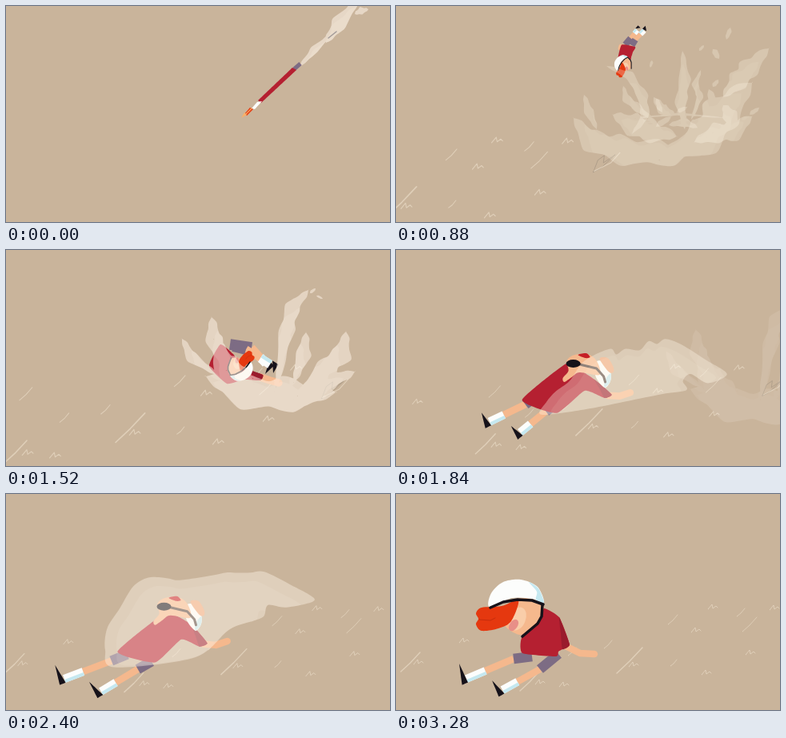
Write an HTML page with a canvas that moves like this. It is 480 px wide and 270 px high and loops after 3360 ms.

```html
<!DOCTYPE html>
<html lang="en">
<head>
<meta charset="utf-8">
<title>Crash landing</title>
<style>
html, body { margin: 0; width: 100%; height: 100%; overflow: hidden; background: #c9b49b; }
canvas { display: block; width: 480px; height: 270px; }
</style>
</head>
<body>
<canvas id="stage" width="480" height="270"></canvas>
<script>
const ctx = document.getElementById('stage').getContext('2d');
const LOOP = 3360, STEP = 80;
const C = {
  bg: '#c9b49b', red: '#b52031', dark: '#991b2c', skin: '#f5b88d', pink: '#e88f88',
  hair: '#e5380f', shorts: '#7d6c84', white: '#fcfdfc', ice: '#c5e8f0', black: '#16121a',
  mark: 'rgba(238,225,205,.6)'
};

const clamp = u => Math.max(0, Math.min(1, u));
const ramp = (t, a, b) => clamp((t - a) / (b - a));
const mix = (a, b, u) => a.map((v, i) => v + (b[i] - v) * u);
const linear = u => u;
const easeOut = u => 1 - (1 - u) ** 2;
const easeInOut = u => u * u * (3 - 2 * u);

// keys: [time, values, easing towards this key]
function at(keys, t) {
  const i = keys.findIndex(k => t <= k[0]);
  if (i < 0) return keys[keys.length - 1][1];
  if (i === 0) return keys[0][1];
  const [t0, v0] = keys[i - 1], [t1, v1, ease = linear] = keys[i];
  return mix(v0, v1, ease(ramp(t, t0, t1)));
}

// Closed Catmull-Rom curve through a flat list of points
function blob(p, path = new Path2D(), k = 0.15) {
  const n = p.length / 2;
  const P = i => { const j = (i + n) % n * 2; return [p[j], p[j + 1]]; };
  path.moveTo(p[0], p[1]);
  for (let i = 0; i < n; i++) {
    const [a, b, c, d] = [P(i - 1), P(i), P(i + 1), P(i + 2)];
    path.bezierCurveTo(b[0] + (c[0] - a[0]) * k, b[1] + (c[1] - a[1]) * k,
      c[0] - (d[0] - b[0]) * k, c[1] - (d[1] - b[1]) * k, c[0], c[1]);
  }
  path.closePath();
  return path;
}
function fill(color, p, k) {
  ctx.fillStyle = color;
  ctx.fill(blob(p, new Path2D(), k));
}
function line(color, w, p, cap = 'round') {
  ctx.strokeStyle = color;
  ctx.lineWidth = w;
  ctx.lineCap = cap;
  ctx.lineJoin = 'round';
  ctx.beginPath();
  for (let i = 0; i < p.length; i += 2) ctx.lineTo(p[i], p[i + 1]);
  ctx.stroke();
}
function oval(color, x, y, rx, ry, rot = 0) {
  ctx.fillStyle = color;
  ctx.beginPath();
  ctx.ellipse(x, y, rx, ry, rot, 0, 7);
  ctx.fill();
}

// Camera: x, y, scale
const CAMERA = [
  [0, [-440, 145, 1.145]],
  [240, [-400, 45, 1.145], easeOut],
  [560, [-382, 20, 1.145]],
  [1200, [-272, -8, 1.145]],
  [1520, [-179, -16, 1.145]],
  [2160, [-22, 5, 1], easeOut],
  [2720, [0, 0, 1], easeOut]
];

// Ground marks: slashes x, y, half size; ticks x, y
const SLASHES = [
  [18, 210, 12], [292, 208, 16], [346, 157, 6], [442, 163, 9], [431, 148, 5],
  [178, 171, 7], [265, 188, 5], [220, 197, 5], [167, 234, 12], [347, 211, 4]
];
const TICKS = [
  [28, 210], [297, 213], [180, 235], [396, 141], [443, 198], [473, 142],
  [375, 170], [210, 238], [85, 183], [388, 223]
];

function ground(t) {
  const [x, y, s] = at(CAMERA, t);
  ctx.save();
  ctx.translate(x, y);
  ctx.scale(s, s);
  SLASHES.forEach(([x, y, r]) => line(C.mark, r > 9 ? 1.4 : 0.9, [x - r, y + r, x, y + 1, x + r, y - r]));
  TICKS.forEach(([x, y]) => line(C.mark, 1, [x - 6, y + 3, x - 1, y - 3, x, y + 2, x + 4, y - 1, x + 6, y + 1]));
  line('rgba(155,140,124,.6)', 0.8, [501, 176, 506, 163, 513, 158, 512, 166, 525, 157, 509, 172, 501, 176]);
  line(C.mark, 1, [502, 175, 520, 166, 530, 155]);
  ctx.restore();
}

// Pose: torso (8 points), two legs (hip, knee, ankle, toe), arm (3 points),
// head x, y, degrees, scale, limb width
const TUMBLE = [
  264, 97, 285, 104, 288, 100, 291, 96, 293, 93, 300, 86, 275, 74, 262, 94,
  282, 76, 295, 69, 311, 60, 318, 58,
  294, 81, 303, 74, 324, 65, 328, 67,
  276, 78, 273, 76, 271, 79, 269, 106, -40, 0.44, 8];
const CRASH = [
  284, 130, 298, 148, 321, 156, 318, 163, 297, 162, 276, 167, 254, 145, 268, 118,
  280, 118, 307, 122, 325, 142, 324, 155,
  284, 120, 300, 124, 330, 143, 334, 154,
  318, 159, 330, 163, 341, 166, 293, 148, 150, 0.45, 11];
const LIE = [
  214, 152, 237, 165, 258, 186, 248, 190, 222, 179, 184, 212, 136, 197, 199, 148,
  148, 200, 129, 209, 70, 231, 58, 214,
  178, 211, 162, 219, 116, 247, 101, 235,
  253, 187, 268, 187, 282, 181, 230, 148, 0, 0.8, 10];
const SIT = [
  182, 143, 204, 154, 217, 188, 208, 194, 203, 197, 200, 203, 158, 199, 157, 180,
  170, 203, 147, 206, 88, 231, 79, 212,
  203, 200, 180, 219, 133, 245, 120, 233,
  212, 190, 230, 199, 248, 200, 150, 140, 0, 1, 10];

// The tumbling body turned upside down, smaller and slimmer
function makeDive() {
  const a = -0.72, ca = Math.cos(a), sa = Math.sin(a), out = [];
  for (let i = 0; i < 40; i += 2) {
    const x = TUMBLE[i] - 269, y = TUMBLE[i + 1] - 106;
    const along = (x * ca + y * sa) * 0.62, across = (y * ca - x * sa) * 0.38;
    out.push(298 - along * 0.08 + across, 63 - along);
  }
  return [...out, -60, 0.18, 5];
}
const POSES = [
  [560, makeDive()], [1200, TUMBLE], [1520, CRASH, easeInOut], [2080, LIE, easeOut],
  [2320, LIE], [2640, SIT, easeInOut]
];

function leg([hx, hy, kx, ky, ax, ay, tx, ty], w) {
  const sx = kx + (ax - kx) * 0.6, sy = ky + (ay - ky) * 0.6;
  const len = Math.hypot(ax - sx, ay - sy) || 1;
  const dx = (ax - sx) / len, dy = (ay - sy) / len;
  const side = (tx - ax) * -dy + (ty - ay) * dx > 0 ? -1 : 1;
  const nx = -dy * side * w * 0.5, ny = dx * side * w * 0.5;
  line(C.skin, w * 0.85, [kx, ky, sx, sy], 'butt');
  line(C.shorts, w * 1.25, [hx, hy, kx, ky], 'butt');
  line(C.white, w, [sx, sy, ax, ay], 'butt');
  line(C.ice, w * 0.4, [sx + nx * 0.6, sy + ny * 0.6, ax + nx * 0.6, ay + ny * 0.6], 'butt');
  fill(C.black, [tx, ty, ax + nx, ay + ny, ax + nx + dx * w * 0.8, ay + ny + dy * w * 0.8], 0);
}

function sittingHead() {
  fill(C.skin, [0, -9, 33, -4, 31, 13, 22, 25, 7, 36, -8, 30, -14, 20]);
  oval('#f9cda9', 2, 16, 10, 15, 0.4);
  oval(C.pink, -3, 24, 5, 8, 0.6);
  line(C.black, 3.5, [33, -1, 32, 13, 27, 22, 8, 38]);
  fill(C.hair, [3, -7, -18, 0, -43, 2, -50, 9, -47, 16, -50, 23, -43, 31, -22, 28, -6, 19]);
  line('#c62c0c', 1, [-46, 17, -32, 18, -26, 15]);
  fill(C.white, [-33, 1, -31, -16, -16, -30, 6, -33, 27, -24, 35, -4, 20, -9, -5, -10]);
  fill(C.ice, [16, -30, 28, -22, 35, -4, 25, -8, 26, -18]);
  line(C.black, 3.5, [-32, 2, -16, -5, 2, -8, 20, -7, 34, -2]);
}

// Thrown back, face up, with dark glasses
function lyingHead() {
  fill(C.white, [8, -8, 20, -8, 27, 6, 26, 17, 19, 24, 8, 10]);
  fill(C.ice, [27, 6, 26, 17, 19, 24, 20, 14]);
  fill(C.skin, [-28, -10, -18, -17, 0, -17, 10, -8, 13, 8, -12, 5, -22, 11, -31, 17, -33, 12, -26, 3]);
  fill('#eda77c', [13, -12, 23, -13, 30, -2, 30, 5, 24, 4]);
  fill('#c51f26', [-14, -17, -4, -19, 1, -14, -5, -13]);
  line('#54433e', 3, [-12, -5, 9, 0, 18, 10, 20, 17]);
  oval(C.black, -20, -6, 9, 5);
}

function figure(t) {
  if (t < 320) return;
  const p = at(POSES, t);
  const rise = t < 560 ? 90 * (1 - easeOut(ramp(t, 320, 560))) : -12 * Math.sin(Math.PI * ramp(t, 560, 1200));
  const [hx, hy, rot, scale, w] = p.slice(38);
  ctx.save();
  ctx.translate(0, rise);
  line(C.skin, w * 0.85, p.slice(32, 38));
  leg(p.slice(16, 24), w);
  leg(p.slice(24, 32), w);
  fill(C.red, p.slice(0, 16), 0.08);
  fill(C.dark, [...p.slice(2, 8), (p[2] + p[6]) / 2, (p[3] + p[7]) / 2], 0.08);
  ctx.translate(hx, hy);
  if (t >= 1680 && t < 2440) lyingHead();
  else {
    ctx.rotate(rot * Math.PI / 180);
    ctx.scale(scale, scale);
    sittingHead();
  }
  ctx.restore();
}

// Billowing strip along a line of points, pointed at both ends
function ribbon(w, p, path) {
  const n = p.length / 2 - 1, steps = n * 4, left = [], right = [];
  const pos = u => {
    const i = Math.min(n - 1, Math.floor(u * n)), f = u * n - i, j = i * 2;
    return [p[j] + (p[j + 2] - p[j]) * f, p[j + 1] + (p[j + 3] - p[j + 1]) * f];
  };
  for (let i = 0; i <= steps; i++) {
    const u = i / steps, [x, y] = pos(u), a = pos(clamp(u - 0.1)), b = pos(clamp(u + 0.1));
    const dir = Math.atan2(b[1] - a[1], b[0] - a[0]);
    const r = w * Math.sin(Math.PI * u) ** 0.7, l = r * (1 + 0.25 * Math.sin(i * 1.9)), m = r * (1 + 0.2 * Math.cos(i * 1.6));
    left.push([x + Math.sin(dir) * l, y - Math.cos(dir) * l]);
    right.unshift([x - Math.sin(dir) * m, y + Math.cos(dir) * m]);
  }
  blob([...left, ...right].flat(), path);
}
function cloud(add) {
  const path = new Path2D();
  add((w, ...p) => ribbon(w, p, path));
  return path;
}
function dust(path, alpha, cx, cy, size = 1, dx = 0, dy = 0) {
  if (alpha <= 0) return;
  ctx.save();
  ctx.translate(cx + dx, cy + dy);
  ctx.scale(size, size);
  ctx.translate(-cx, -cy);
  ctx.fillStyle = `rgba(255,245,233,${alpha})`;
  ctx.fill(path);
  ctx.clip(path);
  ctx.translate(cx, cy + 5);
  ctx.scale(0.88, 0.88);
  ctx.translate(-cx, -cy);
  ctx.fillStyle = `rgba(255,245,233,${alpha * 0.25})`;
  ctx.fill(path);
  ctx.restore();
}

const TAIL = cloud(add => {
  add(4, 367, 76, 385, 55, 410, 32);
  add(8, 400, 46, 416, 22, 442, -10);
  add(4, 436, 10, 444, 6, 453, 4);
});
const SPLASH = cloud(add => {
  add(7, 303, 70, 306, 105, 301, 135, 306, 168);
  add(4, 326, 94, 319, 112, 325, 128, 314, 156);
  add(5, 286, 163, 305, 159, 322, 166);
  add(5, 229, 114, 233, 130, 248, 142, 268, 158);
  add(6, 270, 130, 278, 143, 294, 150);
  add(14, 216, 150, 240, 162, 266, 171, 296, 177);
  add(12, 318, 184, 345, 173, 368, 170, 390, 152);
  add(8, 354, 138, 362, 150, 374, 178);
  add(12, 354, 128, 372, 108, 388, 90, 411, 67);
  add(1.5, 245, 154, 300, 149, 356, 154);
  add(3, 363, 41, 358, 56);
  add(4, 341, 68, 349, 80);
  add(3, 341, 115, 348, 106);
  add(2, 324, 70, 330, 63);
  add(3, 387, 150, 399, 141);
});
const ARC = cloud(add => {
  add(6, 318, 61, 347, 73, 364, 100, 366, 125, 350, 146);
  add(16, 277, 126, 298, 154, 340, 167, 400, 171, 450, 145);
  add(23, 385, 178, 440, 150, 465, 117, 500, 82);
  add(7, 446, 90, 453, 112, 436, 146);
  add(5, 290, 97, 296, 118, 306, 140);
  add(2, 375, 54, 373, 63);
  add(4, 377, 100, 388, 119);
  add(3, 406, 119, 419, 112);
  add(4, 380, 137, 399, 124);
});
const BURST = cloud(add => {
  add(6, 220, 111, 232, 134, 264, 156);
  add(9, 257, 84, 260, 112, 275, 150);
  add(14, 260, 112, 275, 145, 308, 160);
  add(9, 378, 50, 358, 72, 350, 105, 338, 170);
  add(8, 375, 103, 372, 130, 360, 165);
  add(12, 425, 102, 420, 130, 398, 150, 365, 182);
  add(9, 436, 152, 405, 164, 370, 180);
  add(20, 250, 158, 298, 178, 360, 181, 412, 178);
  add(2, 380, 54, 387, 48);
  add(1.5, 388, 57, 396, 61);
});

const SWEEP = [
  165, 213, 172, 195, 185, 180, 205, 165, 222, 140, 240, 128, 264, 119, 272, 127, 285, 119, 305, 121, 318, 108,
  330, 112, 342, 105, 365, 113, 400, 135, 430, 155, 403, 168, 378, 155, 367, 165, 372, 178, 335, 184, 230, 205];
const VEIL = [
  90, 222, 50, 195, 36, 150, 45, 110, 62, 78, 82, 68, 103, 84, 120, 78, 134, 88, 185, 72, 210, 83,
  225, 78, 250, 88, 258, 73, 285, 79, 318, 97, 270, 101, 250, 114, 254, 133, 215, 128, 193, 147, 246, 203];

function drift(t, home) {
  const now = at(CAMERA, t), then = at(CAMERA, home);
  return [now[0] - then[0], now[1] - then[1]];
}

function clouds(t) {
  if (t >= 240 && t < 1120)
    dust(SPLASH, 0.52 * (1 - ramp(t, 640, 1120)), 305, 165, 0.2 + 0.8 * easeOut(ramp(t, 200, 560)), ...drift(t, 560));
  if (t >= 720 && t < 1520)
    dust(ARC, 0.5 * ramp(t, 700, 1040) * (1 - ramp(t, 1240, 1500)), 390, 150, 1, ...drift(t, 1200));
  if (t >= 1360 && t < 1920)
    dust(BURST, 0.5 * (1 - ramp(t, 1560, 1920)), 320, 180, 0.25 + 0.75 * easeOut(ramp(t, 1340, 1520)), ...drift(t, 1520));
  if (t >= 1640 && t < 3280) {
    const u = easeInOut(ramp(t, 2160, 2720)), out = ramp(t, 2720, 3280);
    const alpha = (0.47 * ramp(t, 1600, 1920) - 0.17 * u) * (1 - out);
    dust(blob(mix(SWEEP, VEIL, u)), alpha, 300 - 140 * u, 155,
      0.5 + 0.5 * easeOut(ramp(t, 1600, 2080)), -100 * out, -60 * out);
  }
}

function streak(t) {
  if (t >= 240) return;
  const u = t / 80;
  ctx.save();
  ctx.translate(-5 * u, 14 * u);
  dust(TAIL, 0.55, 405, 38);
  line('#a29a99', 1.5, [403, 40, 413, 32]);
  line(C.shorts, 5, [360, 79, 368, 72], 'butt');
  fill(C.red, [315, 118, 358, 77, 363, 80, 319, 121], 0);
  fill(C.white, [307, 128, 314, 120, 320, 119, 311, 129], 0);
  fill(C.hair, [298, 135, 305, 127, 309, 129, 301, 137], 0);
  fill('#f6b06c', [294, 140, 298, 133, 301, 136], 0);
  line('#f9a65d', 1.2, [300, 135, 307, 128]);
  ctx.restore();
}

function draw(now) {
  const t = Math.floor(now % LOOP / STEP) * STEP;
  ctx.fillStyle = C.bg;
  ctx.fillRect(0, 0, 480, 270);
  ground(t);
  streak(t);
  figure(t);
  clouds(t);
}

const start = performance.now();
(function tick() {
  draw(performance.now() - start);
  requestAnimationFrame(tick);
})();
</script>
</body>
</html>
```
